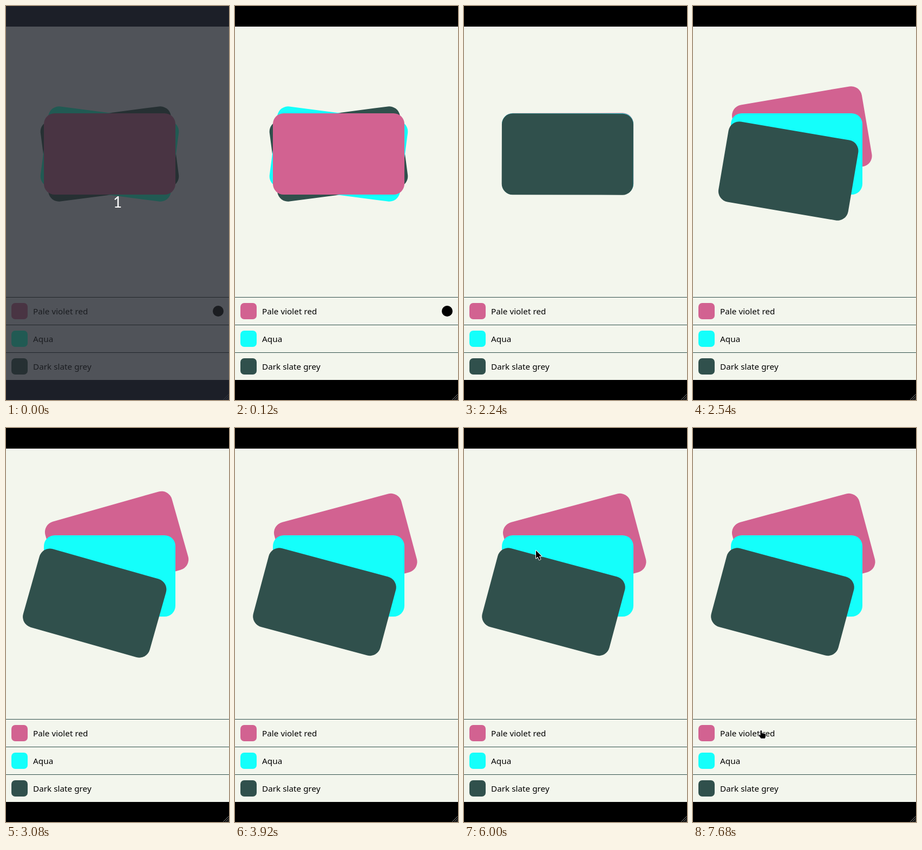
Write an HTML page that moves like this. It is 412x727 px and loops after 8000 ms.

```html
<!DOCTYPE html>
<html lang="en">
<head>
<meta charset="utf-8">
<title>Colour cards</title>
<style>
  html, body { margin: 0; width: 100%; height: 100%; overflow: hidden; background: #fefefd; }
  svg { display: block; width: 412px; height: 727px; }
  #app {
    --bar: #000; --bg: #f3f6ed; --pink: #d26291; --aqua: #14fffb;
    --slate: #30504c; --line: #30504c; --ink: #000;
  }
  #app.dim {
    --bar: #1c1f28; --bg: #505359; --pink: #493443; --aqua: #215a53;
    --slate: #263033; --line: #22272c; --ink: #1b1d21;
  }
  .label { font: 15.3px "Noto Sans", sans-serif; fill: var(--ink); }
  .count { font: 28px Lato, sans-serif; fill: #fff; text-anchor: middle; }
  .cursor { fill: #000; stroke: #fff; stroke-width: 1.8; paint-order: stroke; stroke-linejoin: round; }
</style>
</head>
<body>
<svg viewBox="0 0 412 727">
  <rect width="412" height="727" fill="#fefefd"/>
  <g id="app">
    <rect width="412" height="727" fill="var(--bar)"/>
    <rect y="38" width="412" height="652" fill="var(--bg)"/>
    <g id="cards"></g>
    <g id="rows"></g>
    <circle id="dot" cx="392" cy="563" r="10" fill="var(--ink)"/>
    <text id="count" class="count" x="206" y="372">1</text>
  </g>
  <path id="grip" d="M401.5 726.5l10-10M405.5 726.5l6-6M409.5 726.5l2-2" stroke="#8c8c8c" fill="none"/>
  <path id="arrow" class="cursor" d="M0 0V14.6L3.3 11.5 6 17.4 8.5 16.3 5.9 10.5H10.5Z"/>
  <path id="hand" class="cursor" d="M5.5 2.2a1.3 1.3 0 0 1 2.6 0V6L13.6 7Q15.2 7.3 15.2 9V11Q15.2 13 13.9 15.8H6.5Q5.5 13.5 2.5 10.8 1.6 9.2 3.5 9L5.5 10.2Z"/>
</svg>
<script>
const LOOP = 8000, DIM_END = 120, BLANK = 1660, FAN = 2240, FAN_END = 3920;
const $ = id => document.getElementById(id);

function add(parent, tag, attrs, text) {
  const el = document.createElementNS('http://www.w3.org/2000/svg', tag);
  for (const k in attrs) el.setAttribute(k, attrs[k]);
  if (text) el.textContent = text;
  return parent.appendChild(el);
}
const show = (el, on) => el.setAttribute('visibility', on ? 'visible' : 'hidden');

const cards = {};
for (const name of ['pink', 'aqua', 'slate'])
  cards[name] = add($('cards'), 'rect',
    { x: 70, y: 198, width: 243, height: 150, rx: 20, fill: `var(--${name})` });

[['pink', 'Pale violet red'], ['aqua', 'Aqua'], ['slate', 'Dark slate grey']].forEach(([name, text], i) => {
  const y = 537 + 51 * i, rows = $('rows');
  add(rows, 'rect', { y, width: 412, height: 1, fill: 'var(--line)' });
  add(rows, 'rect', { x: 10, y: y + 11, width: 30, height: 30, rx: 7, fill: `var(--${name})` });
  add(rows, 'text', { x: 50, y: y + 32, class: 'label' }, text);
});

// Pointer stops: time, x, y, shape
const stops = [
  [4880, 21.5, 154, 'arrow'], [5160, 146, 174.5, 'arrow'], [6000, 133, 226, 'arrow'],
  [6280, 126.5, 358, 'arrow'], [6560, 124.5, 467, 'arrow'], [6840, 124.5, 512, 'arrow'],
  [7120, 123.5, 534, 'arrow'], [7160, 119, 533, 'hand'], [7400, 119, 553, 'hand'],
  [7680, 119, 557, 'hand']
];

// Underdamped spring from 0 to 1
function spring(ms) {
  const decay = 0.0036, freq = 0.00395;
  if (ms <= 0) return 0;
  return 1 - Math.exp(-decay * ms) * (Math.cos(freq * ms) + decay / freq * Math.sin(freq * ms));
}

let front = '';
function stack(names) {
  const key = names.join();
  if (key === front) return;
  front = key;
  names.forEach(n => $('cards').appendChild(cards[n]));
}

function pose(pink, aqua, slate, pivot) {
  const angles = { pink, aqua, slate };
  for (const n in angles) cards[n].setAttribute('transform', `rotate(${angles[n]} ${pivot})`);
}

function draw(t) {
  const dim = t < DIM_END, picked = t < BLANK;
  $('app').setAttribute('class', dim ? 'dim' : '');
  $('app').setAttribute('display', !picked && t < FAN ? 'none' : 'inline');
  show($('count'), dim);
  show($('dot'), picked);
  $('grip').setAttribute('opacity', dim ? 0.25 : 1);

  if (picked) {
    stack(['slate', 'aqua', 'pink']);
    pose(0, 7.5, -7.5, '191.5 273');
  } else {
    const a = 15 * (t < FAN_END ? spring(t - FAN + 25) : 1);
    stack(['pink', 'aqua', 'slate']);
    pose(-a, 0, a, '-2.9 198');
  }

  const stop = stops.filter(s => s[0] <= t).pop();
  for (const id of ['arrow', 'hand']) show($(id), stop && stop[3] === id);
  if (stop) $(stop[3]).setAttribute('transform', `translate(${stop[1]} ${stop[2]})`);
}

const start = performance.now();
function tick() {
  draw((performance.now() - start) % LOOP);
  requestAnimationFrame(tick);
}
tick();
</script>
</body>
</html>
```
